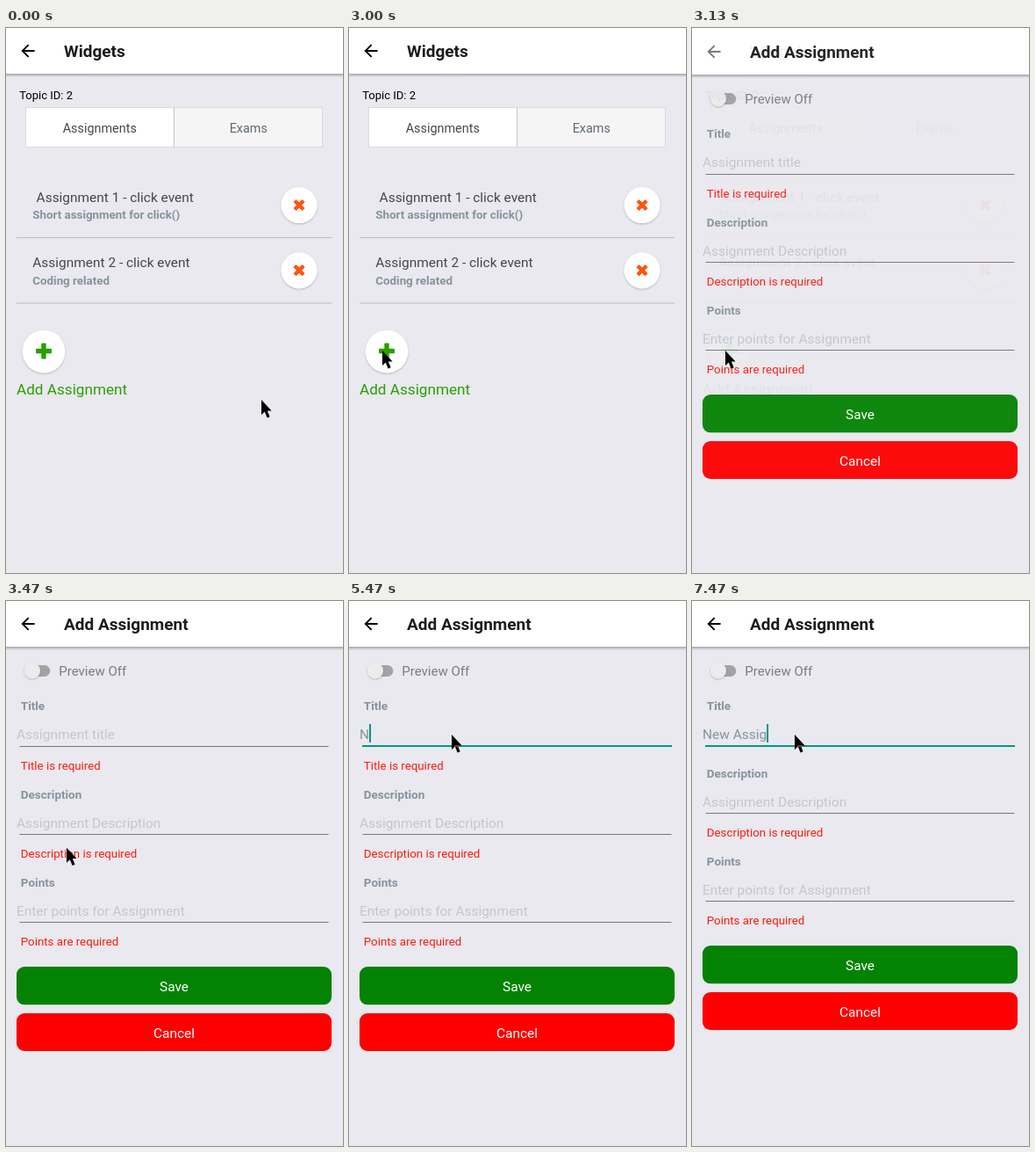
Animation of 384x620 px, one loop 8 s. Source, as an HTML page:

```html
<!DOCTYPE html>
<html lang="en">
<head>
<meta charset="utf-8">
<title>Assignments</title>
<style>
  html, body { margin: 0; width: 100%; height: 100%; overflow: hidden; background: #e9e9ef; }
  svg { display: block; width: 384px; height: 620px; font-family: Roboto, sans-serif; font-size: 15.45px; }
  .head { font-size: 19px; font-weight: 700; fill: #1c1c1e; }
  .topic { font-size: 13px; fill: #000; }
  .tab { font-size: 14.4px; text-anchor: middle; }
  .item { fill: #43484d; }
  .sub, .label { font-size: 13.35px; font-weight: 700; fill: #86939e; }
  .label { font-size: 13.5px; }
  .add { font-size: 17.15px; fill: #2aa000; }
  .hint { fill: #c5c6cd; }
  .error { font-size: 13.3px; fill: #ff190c; }
  .button { fill: #fff; text-anchor: middle; }
  .line { fill: #77777c; }
  .rule { fill: #bcbcc1; }
  .accent { fill: #009688; }
</style>
</head>
<body>
<svg viewBox="0 0 384 620">
  <defs>
    <linearGradient id="fade" x1="0" y1="0" x2="0" y2="1">
      <stop offset="0" stop-color="#000" stop-opacity=".3"/>
      <stop offset="1" stop-color="#000" stop-opacity="0"/>
    </linearGradient>
    <filter id="lift" x="-30%" y="-30%" width="160%" height="160%">
      <feDropShadow dx="0" dy="1" stdDeviation="1.2" flood-color="#000" flood-opacity=".25"/>
    </filter>
    <g id="page">
      <rect width="384" height="620" fill="#e9e9ef"/>
      <rect y="52" width="384" height="4" fill="url(#fade)"/>
      <rect width="384" height="52" fill="#fff"/>
    </g>
    <path id="back" transform="translate(13.6 14.6) scale(.95)"
      d="M20 11H7.83l5.59-5.59L12 4l-8 8 8 8 1.41-1.41L7.83 13H20z"/>
    <g id="remove">
      <circle r="20.5" fill="#fff" filter="url(#lift)"/>
      <g fill="#ff560d" transform="rotate(45)">
        <rect x="-7.2" y="-2.2" width="14.4" height="4.4" rx=".8"/>
        <rect x="-2.2" y="-7.2" width="4.4" height="14.4" rx=".8"/>
      </g>
    </g>
  </defs>

  <g id="list">
    <use href="#page"/>
    <use href="#back"/>
    <text class="head" x="66" y="33.2">Widgets</text>
    <text class="topic" x="15.2" y="80.6">Topic ID: 2</text>

    <rect x="23" y="91" width="168.5" height="44" fill="#fff"/>
    <rect x="191.5" y="91" width="169" height="44" fill="#f5f5f5"/>
    <rect x="22.5" y="90.5" width="338" height="45" fill="none" stroke="#dadade"/>
    <rect x="191" y="91" width="1" height="44" fill="#c4c4c8"/>
    <text class="tab" x="106.8" y="119" fill="#43484d">Assignments</text>
    <text class="tab" x="276.3" y="119" fill="#5e6977">Exams</text>

    <text class="item" x="34.6" y="198">Assignment 1 - click event</text>
    <text class="sub" x="30.3" y="217.3">Short assignment for click()</text>
    <use href="#remove" x="334" y="201.5"/>
    <rect class="rule" x="12" y="238" width="359" height="1"/>
    <text class="item" x="30.3" y="272.3">Assignment 2 - click event</text>
    <text class="sub" x="30.3" y="291.7">Coding related</text>
    <use href="#remove" x="334" y="275.7"/>
    <rect class="rule" x="12" y="312.5" width="359" height="1"/>

    <circle cx="43" cy="368" r="24.3" fill="#fff" filter="url(#lift)"/>
    <g fill="#2aa000">
      <rect x="34" y="364.8" width="18" height="5.4" rx="1"/>
      <rect x="40.3" y="358.5" width="5.4" height="18" rx="1"/>
    </g>
    <text class="add" x="12" y="417.2">Add Assignment</text>
  </g>

  <g id="form">
    <use href="#page"/>
    <use href="#back" id="formBack"/>
    <text class="head" x="66" y="33.2">Add Assignment</text>

    <rect x="23" y="73" width="27.3" height="13" rx="6.5" fill="#a3a2a6"/>
    <circle cx="30" cy="79.2" r="9" fill="#ececec" filter="url(#lift)"/>
    <text x="60.2" y="85" font-size="15.05" fill="#7c7c80">Preview Off</text>

    <text class="label" x="16.8" y="124">Title</text>
    <text class="hint" id="hint" x="12" y="157">Assignment title</text>
    <text id="typed" x="12" y="157" fill="#86939e"></text>
    <rect class="line" id="line" x="15.5" y="165" width="352" height="1"/>
    <rect class="accent" id="focus" x="15" y="164" width="353" height="2"/>
    <rect class="accent" id="caret" y="140" width="2" height="21"/>
    <text class="error" id="titleError" x="16.8" y="191.7">Title is required</text>

    <g id="rest">
      <text class="label" x="16.8" y="224.8">Description</text>
      <text class="hint" x="12" y="257.5">Assignment Description</text>
      <rect class="line" x="15.5" y="265" width="352" height="1"/>
      <text class="error" x="16.8" y="292">Description is required</text>

      <text class="label" x="16.8" y="325.2">Points</text>
      <text class="hint" x="12" y="357.8">Enter points for Assignment</text>
      <rect class="line" x="15.5" y="365" width="352" height="1"/>
      <text class="error" x="16.8" y="392.3">Points are required</text>

      <rect x="12" y="416" width="359" height="43.3" rx="9" fill="#048204"/>
      <text class="button" x="191.5" y="444">Save</text>
      <rect x="12" y="469" width="359" height="43" rx="9" fill="#f00"/>
      <text class="button" x="191.5" y="496.8">Cancel</text>
    </g>
  </g>

  <g id="pointer">
    <path d="M0 0V17L3.8 13.5 6.6 20.4 9.6 19.2 6.8 12.4H11.6Z"/>
    <rect id="glint" x="3" width="5" height="1.4" fill="#d8323a"/>
  </g>
</svg>

<script>
  const LOOP = 8000, RATE = 15 / 1000;
  const $ = id => document.getElementById(id);
  const show = (id, on) => $(id).setAttribute('visibility', on ? 'visible' : 'hidden');

  // Pointer path: tick, x, y
  const path = [
    [0, 291, 423], [1, 283, 439], [2, 248, 404], [3, 214, 325], [4, 188, 252],
    [5, 172, 212], [7, 172, 212], [8, 164, 194], [10, 125, 133],
    [15, 32, 354], [16, 32, 354], [21, 38, 367], [48, 38, 367],
    [51, 56, 318], [54, 95, 206], [57, 113, 154], [67, 113, 154], [70, 117, 152]
  ];
  // Ticks at which each letter arrives
  const title = 'New Assig';
  const keys = [82, 89, 93, 96, 102, 105, 107, 110, 112];

  function pointerAt(k) {
    const i = path.findIndex(p => p[0] > k);
    if (i < 0) return path[path.length - 1].slice(1);
    const [ka, xa, ya] = path[i - 1], [kb, xb, yb] = path[i];
    const u = (k - ka) / (kb - ka);
    return [xa + (xb - xa) * u, ya + (yb - ya) * u];
  }

  // Value for a tick from a short list of successive steps
  const ramp = (k, from, steps) => steps[Math.max(0, Math.min(steps.length - 1, k - from))];

  function draw(k) {
    const focused = k >= 61, valid = k >= 83;
    const text = title.slice(0, keys.filter(t => t <= k).length);

    $('form').setAttribute('opacity', ramp(k, 45, [0, .63, .95, 1]));
    $('form').setAttribute('transform', `translate(0 ${ramp(k, 45, [8, 8, 1, 0])})`);
    $('formBack').setAttribute('opacity', ramp(k, 45, [0, .2, .5, .8, 1]));

    $('typed').textContent = text;
    show('hint', !text);
    show('line', !focused);
    show('focus', focused);
    $('focus').setAttribute('opacity', k === 61 ? .6 : 1);
    show('caret', k >= 64 && (k < 72 || k >= 80));
    $('caret').setAttribute('x', 12 + (text ? $('typed').getComputedTextLength() : 0));
    show('titleError', !valid);
    $('rest').setAttribute('transform', `translate(0 ${valid ? -24 : 0})`);

    const [x, y] = pointerAt(k);
    $('pointer').setAttribute('transform', `translate(${x} ${y})`);
    show('pointer', k < 11 || k > 15);
    show('glint', focused);
    $('glint').setAttribute('y', 164.3 - y);
  }

  const start = performance.now();
  function tick(now) {
    const t = Math.max(0, now - start) % LOOP;
    draw(Math.min(119, Math.floor((t + 4) * RATE)));
    requestAnimationFrame(tick);
  }
  draw(0);
  requestAnimationFrame(tick);
</script>
</body>
</html>
```
